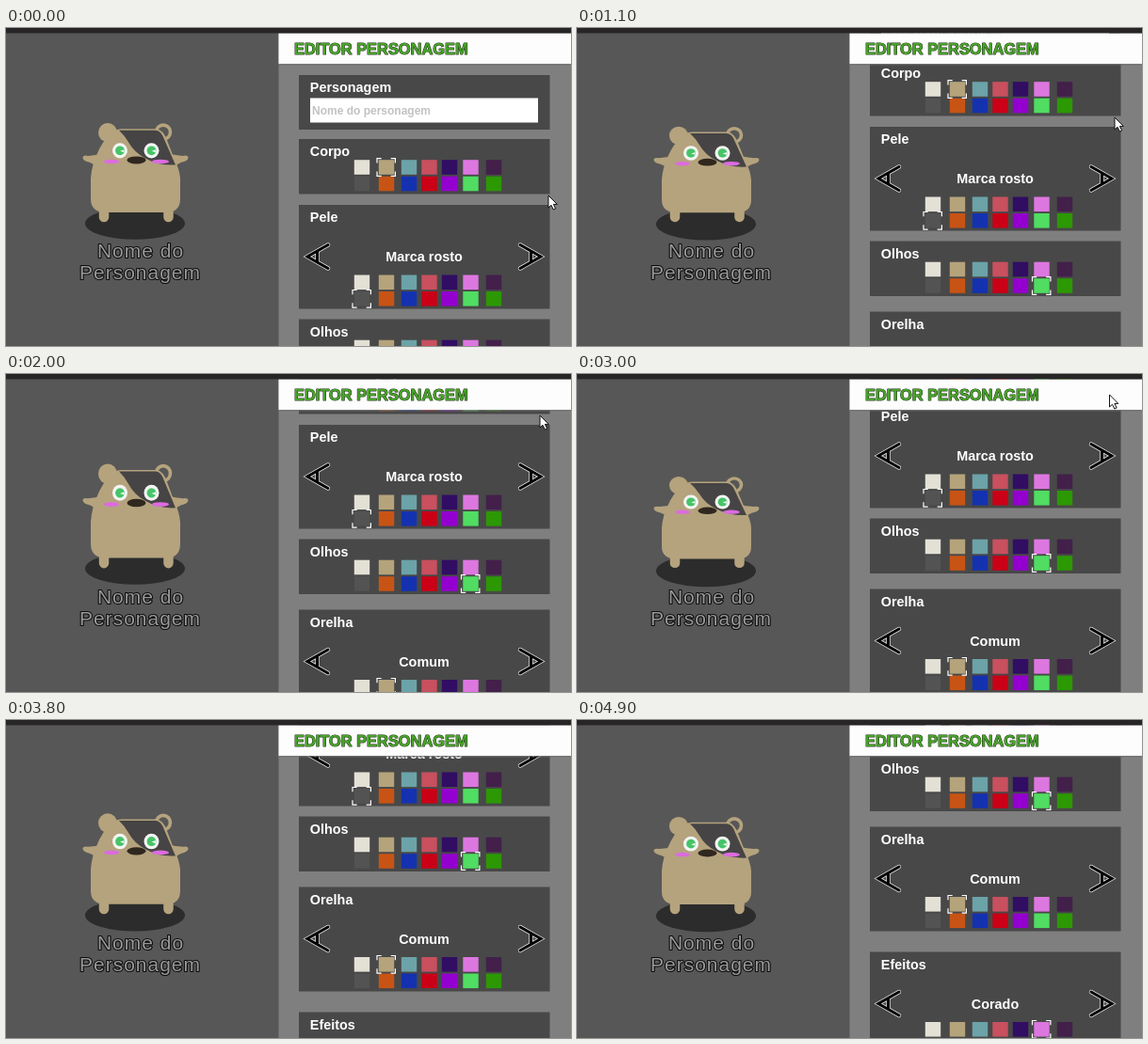
Recreate the animation shown at these times as an HTML page. Size 600 by 338 pixels, loop 5 s.

```html
<!DOCTYPE html>
<html lang="pt">
<head>
<meta charset="utf-8">
<style>
html, body { margin: 0; width: 100%; height: 100%; overflow: hidden; background: #575757; }
svg { display: block; width: 100%; height: 100%; }
text { font-family: "Liberation Sans", Arial, sans-serif; }
.label { font-size: 14.4px; font-weight: bold; fill: #fff; }
.mid { text-anchor: middle; }
.hint { font-size: 12px; font-weight: bold; fill: #c2c2c2; }
.outlined { stroke: #0c0c0c; stroke-width: 2.2px; paint-order: stroke; stroke-linejoin: round; }
.name { font-size: 21px; letter-spacing: 1px; fill: #989898; }
.title { font-size: 16.4px; font-weight: bold; fill: #46a526; stroke: #26331f; stroke-width: 1.1px; }
</style>
</head>
<body>
<svg viewBox="0 0 600 338">
  <rect width="600" height="338" fill="#575757"/>

  <ellipse id="shadow" cx="137" cy="208" rx="53" ry="17" fill="#2c2c2c"/>
  <g id="pet">
    <g fill="none" stroke="#b5a37e">
      <path d="M104 188V201M172.500 188V201" stroke-width="10.500" stroke-linecap="round"/>
      <circle cx="167" cy="111.500" r="7.500" stroke-width="3.600"/>
    </g>
    <g fill="#b5a37e">
      <path id="arm" d="M81.500 138Q82 135.500 87 136.500Q95 136 103 134L98 150Q93 144 86 142.500Q81.500 141 81.500 138Z"/>
      <use href="#arm" transform="translate(275 0) scale(-1 1)"/>
      <circle cx="108" cy="112" r="10"/>
      <path d="M123 108H160Q167 109 171 120L180 143Q184 150 185 160V182Q185 196 170 196H106Q90 196 90 182V160Q91 147 96 136Q102 121 112 112Q117 108 123 108Z"/>
    </g>
    <path d="M120 109.500H159Q165 110 168 119L180 146Q162 147 148 139Q136 133 130 122Q126 115 120 109.500Z" fill="#464444"/>
    <g fill="#dc6be0">
      <ellipse cx="112" cy="142.500" rx="8" ry="2.300"/>
      <ellipse cx="164" cy="142.500" rx="9" ry="2.300"/>
    </g>
    <ellipse cx="138.500" cy="141" rx="10" ry="4" fill="#30281f"/>
    <g id="eyes"></g>
  </g>
  <g class="mid">
    <text class="name outlined" x="143" y="243.500">Nome do</text>
    <text class="name outlined" x="142.500" y="266.500">Personagem</text>
  </g>

  <rect x="289.500" width="311" height="338" fill="#7f7f7f"/>
  <g id="list"></g>
  <rect x="289.500" y="5.500" width="311" height="32.800" fill="#fdfdfd"/>
  <rect x="289.500" y="38.300" width="311" height="1" fill="#666"/>
  <rect width="600" height="5.500" fill="#272525"/>
  <text class="title outlined" x="306" y="27.500">EDITOR PERSONAGEM</text>
  <path id="cursor" d="M0 0V13L3 10.300L5.300 15L7.600 14L5.400 9.400H9.300Z" fill="#fff" stroke="#111" stroke-width="1"/>
</svg>
<script>
const $ = id => document.getElementById(id);
const columns = [378, 404, 428, 449.5, 471, 493.5, 518];
const palette = [
  ["#e3e0d6", "#b5a37b", "#6ba3a8", "#c8505f", "#310d63", "#dd77e0", "#42204a"],
  ["#535353", "#c75415", "#1432b0", "#cb0016", "#9400cf", "#50dd62", "#2c9803"]
];

const panel = (y, h, label, inner) => `<g transform="translate(0 ${y})">
  <rect x="311" width="266.500" height="${h}" fill="#484848"/>
  <text class="label" x="322.800" y="18">${label}</text>${inner}</g>`;

function swatches(y, col, row) {
  const cells = palette.map((colors, r) => colors.map((c, i) =>
    `<rect x="${columns[i] - 8.2}" y="${y + r * 17.5 - 7.8}" width="16.400" height="15.600" fill="${c}"/>`).join("")).join("");
  const corner = [[1, 1], [-1, 1], [1, -1], [-1, -1]].map(([sx, sy]) =>
    `<path d="M5 9.300H9.700V4.500" transform="scale(${sx} ${sy})"/>`).join("");
  return `${cells}<g transform="translate(${columns[col] - 0.3} ${y + row * 17.5})" fill="none" stroke="#fff" stroke-width="1.200">${corner}</g>`;
}

function chooser(value) {
  const shape = "M342 42.500L320 55L342 67.500M330.500 49.500V60.500";
  const arrow = `<g fill="none" stroke-linecap="round"><path d="${shape}" stroke="#e4e4e4" stroke-width="4.400"/><path d="${shape}" stroke="#000" stroke-width="3"/></g>`;
  return `${arrow}<g transform="translate(888 0) scale(-1 1)">${arrow}</g>
    <text class="label mid" x="444" y="60">${value}</text>`;
}

$("list").innerHTML =
  panel(50, 58, "Personagem", `<rect x="323" y="24.500" width="242" height="26" fill="#fff"/>
    <text class="hint" x="325" y="42">Nome do personagem</text>`) +
  panel(118, 58.5, "Corpo", swatches(30, 1, 0)) +
  panel(188, 110.5, "Pele", chooser("Marca rosto") + swatches(82.3, 0, 1)) +
  panel(309.5, 58.5, "Olhos", swatches(30, 5, 1)) +
  panel(384.5, 111, "Orelha", chooser("Comum") + swatches(82.3, 1, 0)) +
  panel(517.5, 111, "Efeitos", chooser("Corado") + swatches(82.3, 5, 0));

$("eyes").innerHTML = [121, 154.5].map(x => `<g transform="translate(${x} 131)">
  <circle r="8" fill="#f3f5f3"/><circle r="4.900" fill="#46c468"/>
  <path d="M0 0.500L4.500 -1V2Z" fill="#f3f5f3"/></g>`).join("");

// time, scroll distance, pointer x
const drag = [[0, 0, 576], [600, 50, 575], [1100, 83, 571], [2000, 134, 567],
  [3000, 156, 565.5], [3800, 207, 565], [4900, 271, 565]];

// cubic through the drag points
function along(t, k) {
  let i = 0;
  while (i < drag.length - 2 && t > drag[i + 1][0]) i++;
  const slope = j => {
    const a = drag[Math.max(j - 1, 0)], b = drag[Math.min(j + 1, drag.length - 1)];
    return (b[k] - a[k]) / (b[0] - a[0]);
  };
  const a = drag[i], b = drag[i + 1], d = b[0] - a[0], u = (t - a[0]) / d, v = 1 - u;
  return v * v * (1 + 2 * u) * a[k] + u * u * (3 - 2 * u) * b[k] + u * v * d * (v * slope(i) - u * slope(i + 1));
}

function draw(now) {
  const t = Math.floor(now % 5000 / 100) * 100;
  const scroll = along(t, 1);
  const breath = Math.cos((t - 650) / 2400 * 2 * Math.PI);
  $("list").setAttribute("transform", `translate(0 ${-scroll})`);
  $("cursor").setAttribute("transform", `translate(${along(t, 2)} ${178 - scroll})`);
  $("pet").setAttribute("transform", `translate(0 204) scale(1 ${1 - 0.069 * breath}) translate(0 -204)`);
  $("shadow").setAttribute("transform", `translate(0 ${1.3 * breath})`);
}

let start;
function tick(now) {
  start ??= now;
  draw(now - start);
  requestAnimationFrame(tick);
}
draw(0);
requestAnimationFrame(tick);
</script>
</body>
</html>
```
